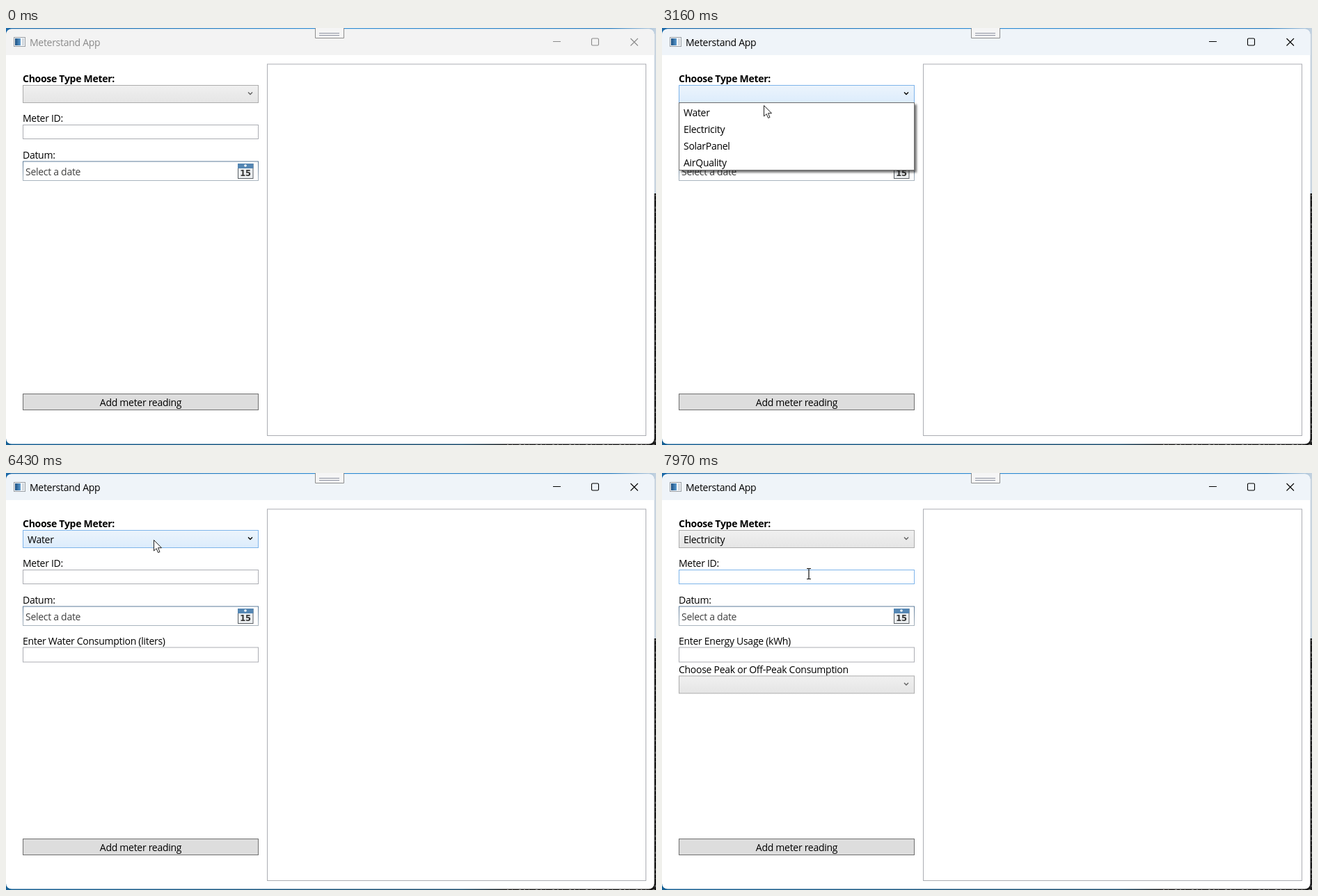
Animation of 934x600 px, one loop 8000 ms. Source, as an HTML page:

```html
<!DOCTYPE html>
<html lang="en">
<head>
<meta charset="utf-8">
<title>Meterstand App</title>
<style>
  html, body { margin: 0; width: 100%; height: 100%; overflow: hidden; }
  svg { display: block; }
  text { font: 14px "Open Sans", "Noto Sans", sans-serif; letter-spacing: -.28px; white-space: pre; }
  .bold { font-weight: 700; }
  .box { fill: #fff; stroke: #abadb3; }
  .box.hover { stroke: #7eb4ea; }
  .combo rect { fill: url(#gray); stroke: #acacac; }
  .combo path { fill: none; stroke: #606060; stroke-width: 1.4; }
  .combo.hover rect { fill: url(#blue); stroke: #7eb4ea; }
  .combo.press rect { fill: url(#deep); stroke: #569de5; }
  .combo.hover path, .combo.press path { stroke: #000; }
  #bar { fill: #f3f3f3; }
  #name { fill: #8a8a8a; }
  #keys { fill: none; stroke: #8a8a8a; stroke-width: 1.1; }
  .active #bar { fill: #eff4f9; }
  .active #name { fill: #000; }
  .active #keys { stroke: #000; }
  #list { filter: drop-shadow(3px 3px 1.5px #0008); }
</style>
</head>
<body>
<svg id="stage" width="934" height="600" viewBox="0 0 934 600">
  <defs>
    <linearGradient id="gray" x2="0" y2="1"><stop stop-color="#f0f0f0"/><stop offset="1" stop-color="#e5e5e5"/></linearGradient>
    <linearGradient id="blue" x2="0" y2="1"><stop stop-color="#ecf4fc"/><stop offset="1" stop-color="#dcecfc"/></linearGradient>
    <linearGradient id="deep" x2="0" y2="1"><stop stop-color="#daecfc"/><stop offset="1" stop-color="#c4e0fc"/></linearGradient>
    <linearGradient id="edge" x2="0" y2="1"><stop stop-color="#5c7b99"/><stop offset="1" stop-color="#a9b4be"/></linearGradient>
    <linearGradient id="sky"><stop stop-color="#1d6aa8"/><stop offset=".5" stop-color="#3b93d6"/><stop offset=".93" stop-color="#2c7fc0"/><stop offset="1" stop-color="#c5d3e0"/></linearGradient>
    <linearGradient id="sea"><stop stop-color="#145f94"/><stop offset=".7" stop-color="#174a6c"/><stop offset=".77" stop-color="#1c1c1c"/></linearGradient>
    <linearGradient id="pane"><stop stop-color="#1c4f80"/><stop offset="1" stop-color="#5b9bd0"/></linearGradient>
    <clipPath id="frame"><rect y="1.5" width="931.5" height="597" rx="8"/></clipPath>
  </defs>

  <!-- desktop -->
  <rect width="934" height="300" fill="url(#sky)"/>
  <rect y="300" width="934" height="300" fill="url(#sea)"/>
  <rect x="924" y="8" width="10" height="230" fill="#c9d4df"/>
  <rect x="924" y="238" width="10" height="362" fill="#1b1b1b"/>
  <path d="M933 240V600M720 599.5H934" stroke="#777" stroke-dasharray="2 5 1 9 3 4" fill="none"/>

  <!-- window -->
  <g clip-path="url(#frame)">
    <rect width="932" height="600" fill="#fff"/>
    <rect id="bar" width="932" height="39"/>
  </g>
  <rect x="11.5" y="13.5" width="16" height="13" fill="#f4f6f8" stroke="#9a9fa5"/>
  <rect x="13" y="15" width="8" height="10" fill="url(#pane)"/>
  <rect x="23" y="15" width="3" height="10" fill="#d3d9df"/>
  <text id="name" x="34" y="25.5">Meterstand App</text>
  <g id="keys">
    <path d="M786 19.5h11M897.5 15l10.5 10.5m0-10.5l-10.5 10.5"/>
    <rect x="841.5" y="15" width="10" height="10" rx="1.5"/>
  </g>
  <path d="M444.5 0V14.5H485.5V0" fill="#f5f5f5" stroke="#8e8e8e"/>
  <path d="M450 7.5h29M450 10.5h29" stroke="#8b90a0"/>
  <rect class="box" x="375.5" y="52" width="544" height="534.5"/>

  <!-- form -->
  <text class="bold" x="24" y="78">Choose Type Meter:</text>
  <g id="combo" class="combo">
    <rect x="24.5" y="82.5" width="338" height="25"/>
    <path d="M348 92.5l3 3 3-3"/>
    <text id="choice" x="31" y="101"></text>
  </g>
  <text x="24" y="135">Meter ID:</text>
  <rect id="meter" class="box" x="24.5" y="139.5" width="338" height="20"/>
  <text x="24" y="187.5">Datum:</text>
  <rect x="24.5" y="192" width="338" height="27.5" fill="#fff" stroke="url(#edge)"/>
  <text x="28" y="211.5" fill="#404040">Select a date</text>
  <rect x="333.5" y="195.5" width="21.5" height="21" fill="#eceff1" stroke="#5a5f64"/>
  <rect x="333" y="195" width="22.5" height="7" fill="#5486b3"/>
  <circle cx="344" cy="198" r="1.8" fill="#fff"/>
  <text x="344" y="213" text-anchor="middle" style="font:bold 11.5px 'DejaVu Sans',sans-serif" fill="#333">15</text>
  <g id="usage">
    <text id="ask" x="24" y="246.5"></text>
    <rect id="amount" class="box" x="24.5" y="251" width="338" height="21"/>
  </g>
  <g id="peak" class="combo">
    <text x="24" y="287.5">Choose Peak or Off-Peak Consumption</text>
    <rect x="24.5" y="292" width="338" height="25"/>
    <path d="M348 302l3 3 3-3"/>
  </g>
  <rect x="24.5" y="526.5" width="338" height="23" fill="#ddd" stroke="#707070"/>
  <text x="193.5" y="543.5" text-anchor="middle">Add meter reading</text>

  <!-- drop-down -->
  <svg id="popup" x="24" y="107" width="346" height="106">
    <g id="list">
      <rect x=".5" y=".5" width="338" height="97" fill="#fff" stroke="#6b6b6b"/>
      <rect id="mark" x="1.5" width="336" height="24" fill="#cbe8f6" stroke="#26a0da"/>
      <text x="7" y="19.5">Water</text>
      <text x="7" y="43.5">Electricity</text>
      <text x="7" y="67.5">SolarPanel</text>
      <text x="7" y="91.5">AirQuality</text>
    </g>
  </svg>

  <!-- pointers -->
  <path id="arrow" d="M.5.5V16l3.6-3.4 2.5 5.9 2.4-1-2.5-5.8h5z" fill="#fff" stroke="#222" stroke-width="1"/>
  <path id="beam" d="M-3-7.5h2.5L0-7l.5-.5H3M0-7V7M-3 7.5h2.5L0 7l.5.5H3" fill="none" stroke="#111" stroke-width="1.2"/>
</svg>
<script>
const $ = id => document.getElementById(id);
const LOOP = 8000, ITEM = 24, LIST_TOP = 108;

// pointer path: time, x, y
const path = [
  [590, 852, 495], [700, 430, 200], [790, 90, 1], [860, 12, 20], [990, 117, 49],
  [1190, 117, 49], [1260, 140, 75], [1460, 140, 75], [1740, 160, 84], [2160, 151, 89],
  [2270, 152, 90], [3090, 152, 90], [3160, 146, 111], [3430, 144, 117], [4160, 144, 117],
  [4500, 135, 200], [4720, 125, 292], [4930, 122, 235], [5070, 122, 235], [5300, 130, 327],
  [5600, 170, 300], [5750, 195, 258], [5820, 195, 258], [6000, 206, 180], [6170, 212, 83],
  [6370, 212, 83], [6430, 212, 96], [7100, 212, 96], [7300, 212, 120], [7510, 209, 143],
  [7770, 209, 143], [7970, 211, 145], [8000, 211, 145]
];
// opening and closing times of the drop-down
const openings = [[2690, 3700], [6710, 7770]];

function pointer(t) {
  const i = path.findIndex(p => p[0] > t);
  if (i < 1) return null;
  const [t0, x0, y0] = path[i - 1], [t1, x1, y1] = path[i];
  const k = (t - t0) / (t1 - t0);
  return { x: x0 + (x1 - x0) * k, y: y0 + (y1 - y0) * k };
}

const show = (id, on) => $(id).style.display = on ? "" : "none";
const move = (id, x, y) => $(id).setAttribute("transform", `translate(${x} ${y})`);
const toggle = (id, name, on) => $(id).classList.toggle(name, on);

function draw(t) {
  const p = pointer(t);
  const inside = (top, bottom) => !!p && p.x > 24 && p.x < 363 && p.y >= top && p.y <= bottom;
  const choice = t < 3700 ? "" : t < 7770 ? "Water" : "Electricity";
  const span = openings.find(([a, b]) => t >= a && t < b);

  toggle("stage", "active", t >= 2620);
  toggle("combo", "hover", inside(82, span ? 113 : 108));
  toggle("combo", "press", (t >= 2620 && t < 2690) || (t >= 6700 && t < 6770));
  $("choice").textContent = choice;
  show("usage", choice);
  show("peak", choice === "Electricity");
  $("ask").textContent = choice === "Water" ? "Enter Water Consumption (liters)" : "Enter Energy Usage (kWh)";

  show("popup", span);
  if (span) {
    const slide = Math.min(1, (t - span[0]) / 130);
    move("list", 0, (slide - 1) * 98);
    const hot = p.y >= 113.5 ? Math.floor((p.y - LIST_TOP) / ITEM) : choice ? 0 : -1;
    show("mark", hot >= 0);
    $("mark").setAttribute("y", 1.5 + hot * ITEM);
  }

  const onMeter = !span && inside(139, 160);
  const onAmount = !span && !!choice && inside(251, 272);
  const typing = onMeter || onAmount || (!span && inside(192, 219));
  toggle("meter", "hover", onMeter);
  toggle("amount", "hover", onAmount);
  show("arrow", p && !typing);
  show("beam", p && typing);
  if (p) move(typing ? "beam" : "arrow", Math.round(p.x), Math.round(p.y));
}

const start = performance.now();
function tick() {
  draw((performance.now() - start) % LOOP);
  requestAnimationFrame(tick);
}
tick();
</script>
</body>
</html>
```
